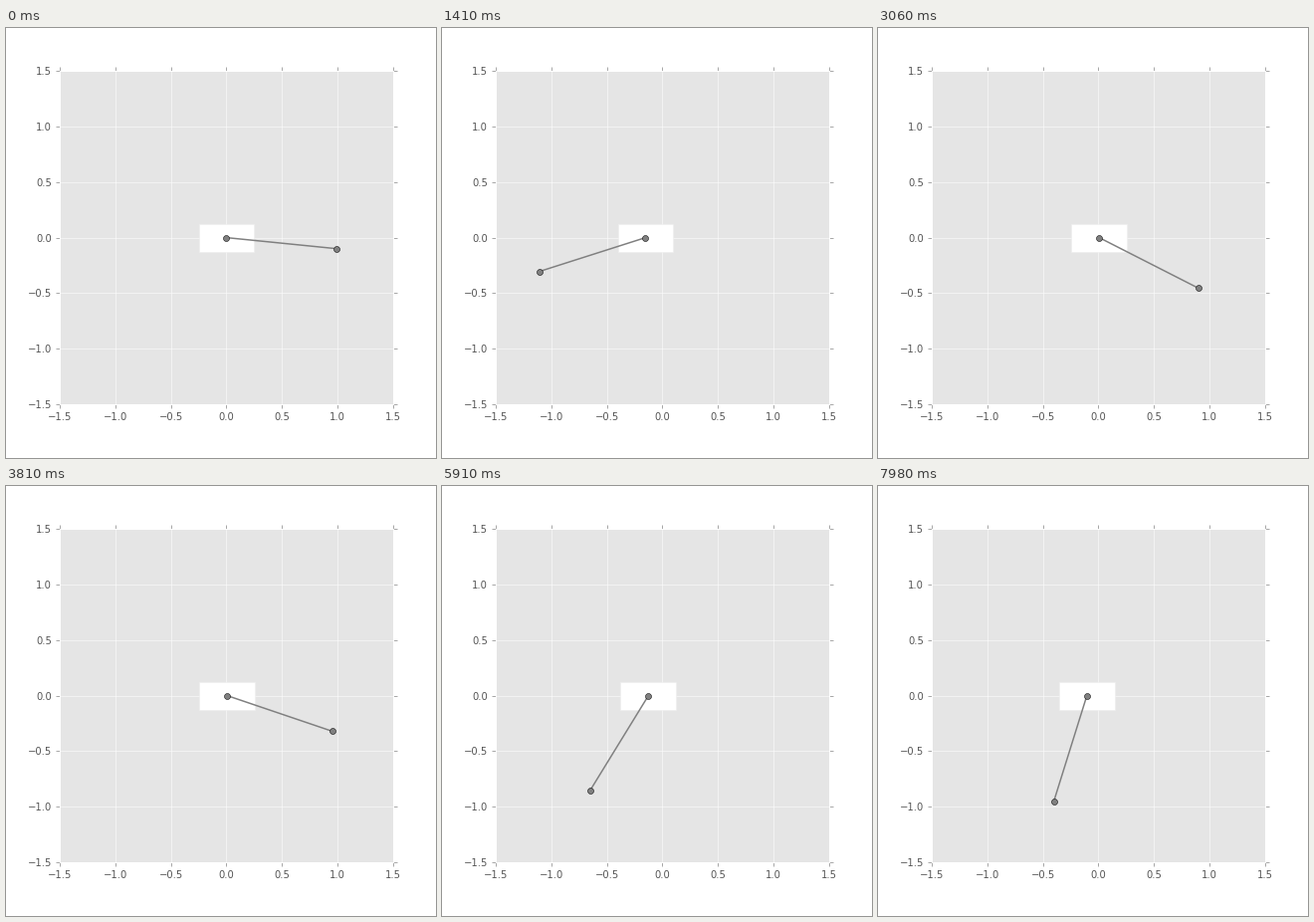
A matplotlib script that plays this animation: 432x432 px, repeating every 8 s.

```python
import math

import matplotlib.pyplot as plt
import numpy as np
from matplotlib.animation import FuncAnimation
from matplotlib.patches import Rectangle

LOOP_MS, TICK_MS, POSE_MS = 8000, 20, 30
STIFFNESS = 4.274                # effective g / l, in 1/s^2
START = math.radians(84.38)      # released from rest at this angle
CART_GAIN = 0.52
CART_W, CART_H = 0.5, 0.25
SUBSTEPS = 10

plt.rcParams.update({"font.family": "DejaVu Sans", "font.size": 10})


def swing(count):
    """Pendulum angle after 1..count poses, leapfrog integrated."""
    h = POSE_MS / 1000 / SUBSTEPS
    angle, speed = START, 0.0
    out = []
    for _ in range(count):
        for _ in range(SUBSTEPS):
            speed -= 0.5 * h * STIFFNESS * math.sin(angle)
            angle += h * speed
            speed -= 0.5 * h * STIFFNESS * math.sin(angle)
        out.append(angle)
    return np.array(out)


def cart_position(angle):
    drift = 4 / 3 * math.cos(START)
    return CART_GAIN * ((np.sin(angle) - math.sin(START)) / 3
                        - drift * (angle - START))


angles = swing(LOOP_MS // POSE_MS + 1)
carts = cart_position(angles)

fig = plt.figure(figsize=(6, 6), dpi=72, facecolor="white")
ax = fig.add_axes([0.125, 0.125, 0.775, 0.775], facecolor="#E5E5E5")
ax.set(xlim=(-1.5, 1.5), ylim=(-1.5, 1.5))
ticks = np.arange(-1.5, 1.6, 0.5)
ax.set_xticks(ticks)
ax.set_yticks(ticks)
ax.set_axisbelow(True)
ax.grid(True, color="white", linestyle="-", linewidth=0.5)
ax.tick_params(direction="out", length=4, width=0.5, pad=4, color="#555555",
               labelcolor="#555555", top=True, right=True)
for spine in ax.spines.values():
    spine.set(color="white", linewidth=1)

cart = ax.add_patch(Rectangle((0, -CART_H / 2), CART_W, CART_H,
                              facecolor="white", edgecolor="#EEEEEE",
                              linewidth=0.5))
rod, = ax.plot([], [], "o-", color="gray", linewidth=1.5, markersize=6,
               markeredgecolor="black", markeredgewidth=0.5)


def draw(i):
    pose = (i * TICK_MS + TICK_MS // 2) // POSE_MS
    x, angle = carts[pose], angles[pose]
    cart.set_x(x - CART_W / 2)
    rod.set_data([x, x + math.sin(angle)], [0, -math.cos(angle)])
    return cart, rod


anim = FuncAnimation(fig, draw, frames=LOOP_MS // TICK_MS, interval=TICK_MS,
                     init_func=lambda: draw(0), repeat=True, repeat_delay=0,
                     blit=False)
plt.show()
```
